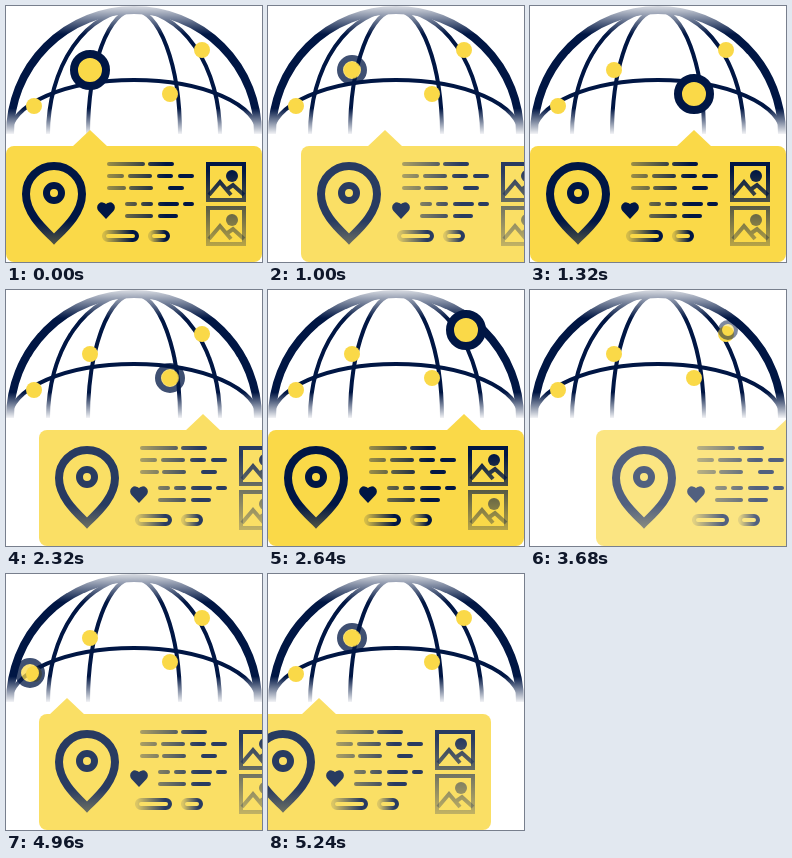
An HTML page that plays this animation: 256x256 px, repeating every 5280 ms.

```html
<!DOCTYPE html>
<html lang="en">
<head>
<meta charset="utf-8">
<title>Places on a globe</title>
<style>
  html, body { margin: 0; width: 100%; height: 100%; overflow: hidden; background: #fff; }
  svg { display: block; width: 100vw; height: 100vh; }
  .line { fill: none; stroke: #001644; stroke-width: 4; }
  .navy { fill: #001644; }
  .gold { fill: #fad948; }
</style>
</head>
<body>
<svg viewBox="0 0 256 256">
  <defs>
    <linearGradient id="fade" gradientUnits="userSpaceOnUse" x1="0" y1="0" x2="0" y2="128">
      <stop offset="0" stop-color="#fff" stop-opacity=".15"/>
      <stop offset=".22" stop-color="#fff"/>
      <stop offset=".8" stop-color="#fff"/>
      <stop offset="1" stop-color="#fff" stop-opacity=".05"/>
    </linearGradient>
    <mask id="globeMask" maskUnits="userSpaceOnUse" x="0" y="0" width="256" height="128">
      <rect width="256" height="128" fill="url(#fade)"/>
    </mask>
    <linearGradient id="textInk" gradientUnits="userSpaceOnUse" x1="98" y1="0" x2="160" y2="0">
      <stop offset="0" stop-color="#001644" stop-opacity=".35"/>
      <stop offset="1" stop-color="#001644"/>
    </linearGradient>
    <linearGradient id="pillInk">
      <stop offset="0" stop-color="#001644" stop-opacity=".15"/>
      <stop offset=".85" stop-color="#001644"/>
    </linearGradient>
    <linearGradient id="photoInk" gradientUnits="userSpaceOnUse" x1="0" y1="165" x2="0" y2="242">
      <stop offset="0" stop-color="#001644"/>
      <stop offset="1" stop-color="#001644" stop-opacity=".25"/>
    </linearGradient>
    <linearGradient id="pinInk" gradientUnits="userSpaceOnUse" x1="0" y1="215" x2="0" y2="240">
      <stop offset="0" stop-color="#001644"/>
      <stop offset="1" stop-color="#001644" stop-opacity=".65"/>
    </linearGradient>
  </defs>

  <g class="line" mask="url(#globeMask)">
    <circle cx="128" cy="128" r="124" stroke-width="8" style="stroke-width:8"/>
    <ellipse cx="128" cy="128" rx="86" ry="124"/>
    <ellipse cx="128" cy="128" rx="46" ry="124"/>
    <ellipse cx="128" cy="128" rx="124" ry="54"/>
  </g>
  <g class="gold">
    <circle cx="84" cy="64" r="8"/>
    <circle cx="164" cy="88" r="8"/>
    <circle cx="196" cy="44" r="8"/>
    <circle cx="28" cy="100" r="8"/>
  </g>
  <circle id="ring" class="gold" r="16" stroke="#001644" stroke-width="8"/>

  <g id="card">
    <rect class="gold" y="140" width="256" height="116" rx="8"/>
    <path id="tip" class="gold" d="M-18 141L0 124L18 141z"/>
    <path class="line" style="stroke:url(#pinInk);stroke-width:8"
      d="M48 233C39 224 20 208 20 188a28 28 0 0 1 56 0C76 208 57 224 48 233z"/>
    <circle class="line" cx="48" cy="187" r="7.5" style="stroke-width:7"/>
    <path class="navy" d="M100 213l-7.5-8a5 5 0 0 1 7.5-7a5 5 0 0 1 7.5 7z"/>
    <g id="text" fill="url(#textInk)"></g>
    <g fill="none" stroke="url(#pillInk)" stroke-width="4">
      <rect x="98" y="226" width="33" height="8" rx="4"/>
      <rect x="144" y="226" width="18" height="8" rx="4"/>
    </g>
    <g id="photos" fill="none" stroke="url(#photoInk)" stroke-width="4"></g>
  </g>
</svg>
<script>
const $ = id => document.getElementById(id);

// Each row: y, then start and end of every dash
const rows = [
  [158, 101, 139, 142, 168],
  [170, 101, 118, 122, 146, 151, 167, 172, 188],
  [182, 101, 120, 123, 147, 162, 178],
  [198, 119, 131, 135, 147, 152, 173, 177, 188],
  [210, 119, 147, 152, 172]
];
for (const [y, ...xs] of rows)
  for (let i = 0; i < xs.length; i += 2)
    $('text').innerHTML += `<rect x="${xs[i]}" y="${y - 2}" width="${xs[i + 1] - xs[i]}" height="4" rx="2"/>`;

for (const y of [156, 200])
  $('photos').innerHTML += `<rect x="202" y="${y + 2}" width="36" height="36"/>
    <path d="M203 ${y + 33}L214 ${y + 20}L225 ${y + 33}M220 ${y + 28}L227 ${y + 23}L238 ${y + 33}"/>
    <circle cx="226" cy="${y + 14}" r="6" fill="url(#photoInk)" stroke="none"/>`;

// Ring centre and pointer x for each stop
const stops = [[84, 64, 84], [164, 88, 164], [198, 40, 196], [24, 99, 28]];
const HOLD = 1000, STEP = 40, STAY = 1320;

function draw() {
  const t = performance.now() % (STAY * stops.length);
  const local = t % STAY;
  const step = local < HOLD ? 0 : Math.floor((local - HOLD) / STEP) + 1;
  const entering = step > 4;
  const away = entering ? 9 - step : step;
  const [x, y, tipX] = stops[(Math.floor(t / STAY) + entering) % stops.length];
  const size = 1 - away / 4;

  $('ring').setAttribute('transform', `translate(${x} ${y}) scale(${size})`);
  $('ring').setAttribute('opacity', size);
  $('tip').setAttribute('transform', `translate(${tipX})`);
  $('card').setAttribute('transform', `translate(${entering ? -33 * away : 33 * away})`);
  $('card').setAttribute('opacity', 1 - away * .16);
  requestAnimationFrame(draw);
}
draw();
</script>
</body>
</html>
```
